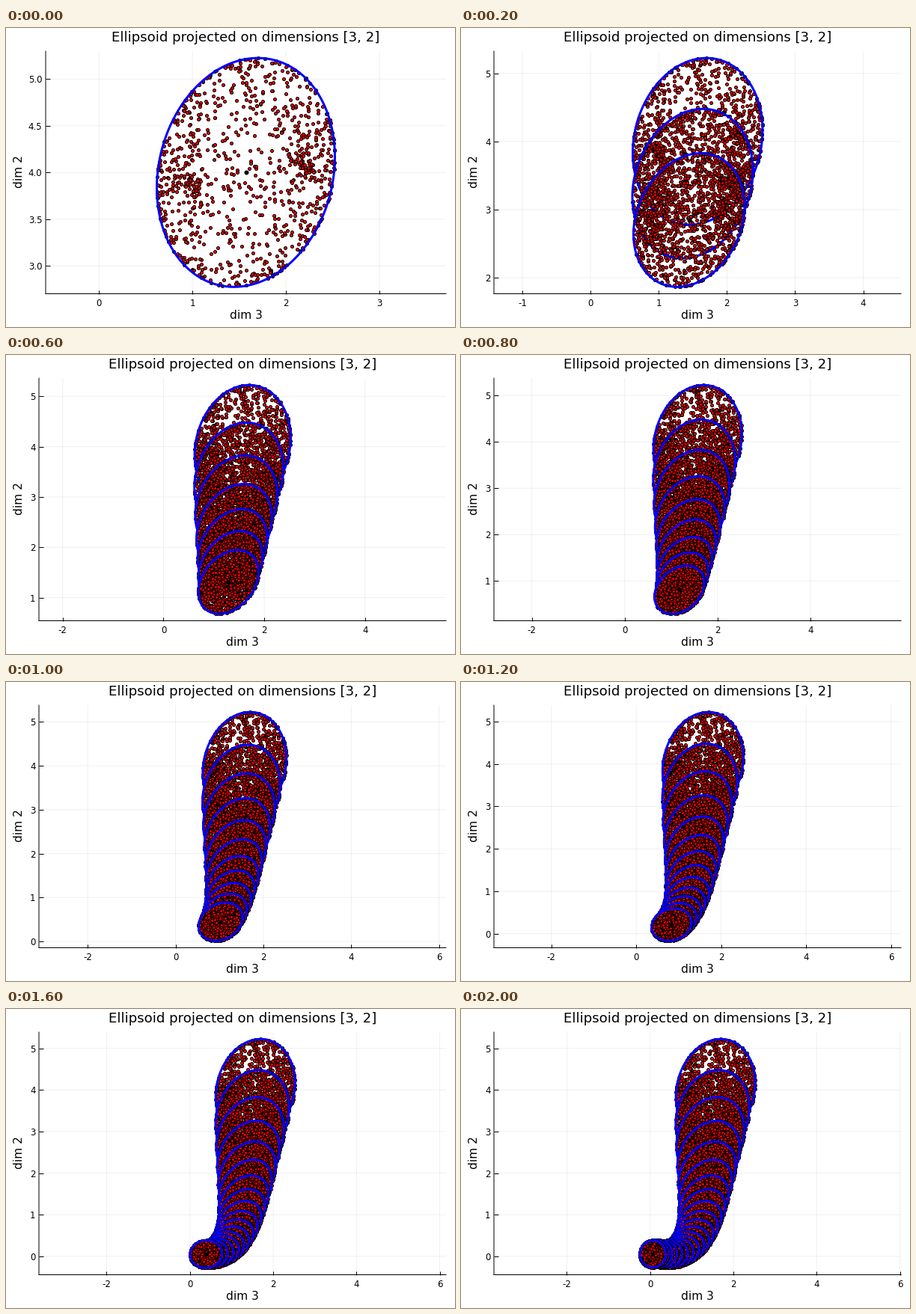
These frames come from a looping animation (600 by 400 pixels, 2100 ms). A matplotlib script:

```python
import matplotlib.pyplot as plt
import numpy as np
from matplotlib.animation import FuncAnimation

W, H, DPI = 600, 400, 100
STEPS, POINTS = 21, 1000
TOP, BOTTOM, RIGHT = 31, 355.5, 588
PX = 72 / DPI  # points per pixel

plt.rcParams["font.family"] = "DejaVu Sans"
plt.rcParams["axes.unicode_minus"] = False
plt.rcParams["path.snap"] = False

t = np.linspace(0, 1, STEPS)


def through(*keys):
    """Smooth curve through evenly spaced key values."""
    knots = np.linspace(0, 1, len(keys))
    return np.polyval(np.polyfit(knots, keys, len(keys) - 1), t)


# Ellipse centre, half extents and tilt along the trajectory
cx = through(np.pi / 2, 1.367, 1.178, 0.83, 0.387, 0.064)
cy = through(4, 1.975, 0.81, 0.212, 0.055, 0.057)
sx = through(0.952, 0.69, 0.537, 0.47, 0.385, 0.312)
sy = 0.325 + 0.9 * (1 - t) ** 3
tilt = 0.31 * np.exp(-((t - 0.31) / 0.34) ** 2)


def place(k, u, v):
    """Map the unit disc onto ellipse k."""
    lean = tilt[k] * u + np.sqrt(1 - tilt[k] ** 2) * v
    return cx[k] + sx[k] * u, cy[k] + sy[k] * lean


def sample(rng, pole=0.64):
    """Project sphere points with uniform angles, so they crowd at two poles."""
    polar = rng.uniform(0, np.pi, POINTS)
    turn = rng.uniform(0, 2 * np.pi, POINTS)
    side = np.sqrt(1 - pole ** 2)
    u = pole * np.cos(polar) + side * np.sin(polar) * np.cos(turn)
    return u, np.sin(polar) * np.sin(turn)


fig = plt.figure(figsize=(W / DPI, H / DPI), dpi=DPI, facecolor="white")
ax = fig.add_axes([0, 0, 1, 1])
ax.set_axisbelow(True)
ax.spines[["top", "right"]].set_visible(False)
ax.spines[["left", "bottom"]].set_linewidth(PX)
ax.grid(color="black", alpha=0.06, linewidth=PX)
ax.tick_params(direction="in", length=5.5 * PX, width=PX, labelsize=11.8 * PX)
ax.tick_params(axis="x", pad=6 * PX)
ax.tick_params(axis="y", pad=4.5 * PX)


def label(x, y, text, size, **kw):
    return fig.text(x / W, 1 - y / H, text, fontsize=size * PX, ha="center", **kw)


title = label(316, 17.5, "Ellipsoid projected on dimensions [3, 2]", 18.2, va="baseline")
xlabel = label(316, 389, "dim 3", 15.4, va="baseline")
label(17, 192.5, "dim 2", 15.4, va="center", rotation=90)

rng = np.random.default_rng(7)
angle = np.linspace(0, 2 * np.pi, 200)
layers = []
for k in range(STEPS):
    dots, = ax.plot(*place(k, *sample(rng)), "o", ms=4 * PX, mfc="red",
                    mec="black", mew=PX, zorder=3 + k)
    line, = ax.plot(*place(k, np.cos(angle), np.sin(angle)), color="blue",
                    lw=3 * PX, zorder=3.5 + k)
    layers.append((dots, line))
centre, = ax.plot([], [], "o", ms=5 * PX, color="black", mew=PX, zorder=50)


def ticks(lo, hi):
    """Finest step that gives at most six marks."""
    for step in (0.5, 1, 2):
        marks = np.arange(np.ceil(lo / step), np.floor(hi / step) + 1) * step
        if len(marks) <= 6:
            break
    form = "{:.1f}" if step < 1 else "{:.0f}"
    return marks, [form.format(m + 0.0) for m in marks], step


def update(k):
    for i, layer in enumerate(layers):
        for artist in layer:
            artist.set_visible(i <= k)
    centre.set_data([cx[k]], [cy[k]])

    # Fit the height with 3% padding and keep equal units
    seen = slice(0, k + 1)
    low, high = (cy - sy)[seen].min(), (cy + sy)[seen].max()
    pad = 0.03 * (high - low)
    low, high = low - pad, high + pad
    marks, names, step = ticks(low, high)
    left = 53 if step < 1 else 44
    ax.set_position([left / W, 1 - BOTTOM / H, (RIGHT - left) / W, (BOTTOM - TOP) / H])
    ax.set_ylim(low, high)
    ax.set_yticks(marks, names)

    mid = ((cx - sx)[seen].min() + (cx + sx)[seen].max()) / 2
    half = (RIGHT - left) / 2 * (high - low) / (BOTTOM - TOP)
    ax.set_xlim(mid - half, mid + half)
    ax.set_xticks(*ticks(mid - half, mid + half)[:2])

    for text in (title, xlabel):
        text.set_x((left + RIGHT) / 2 / W)
    return []


anim = FuncAnimation(fig, update, frames=STEPS, interval=100, repeat=True,
                     repeat_delay=0, init_func=lambda: update(0))
plt.show()
```
